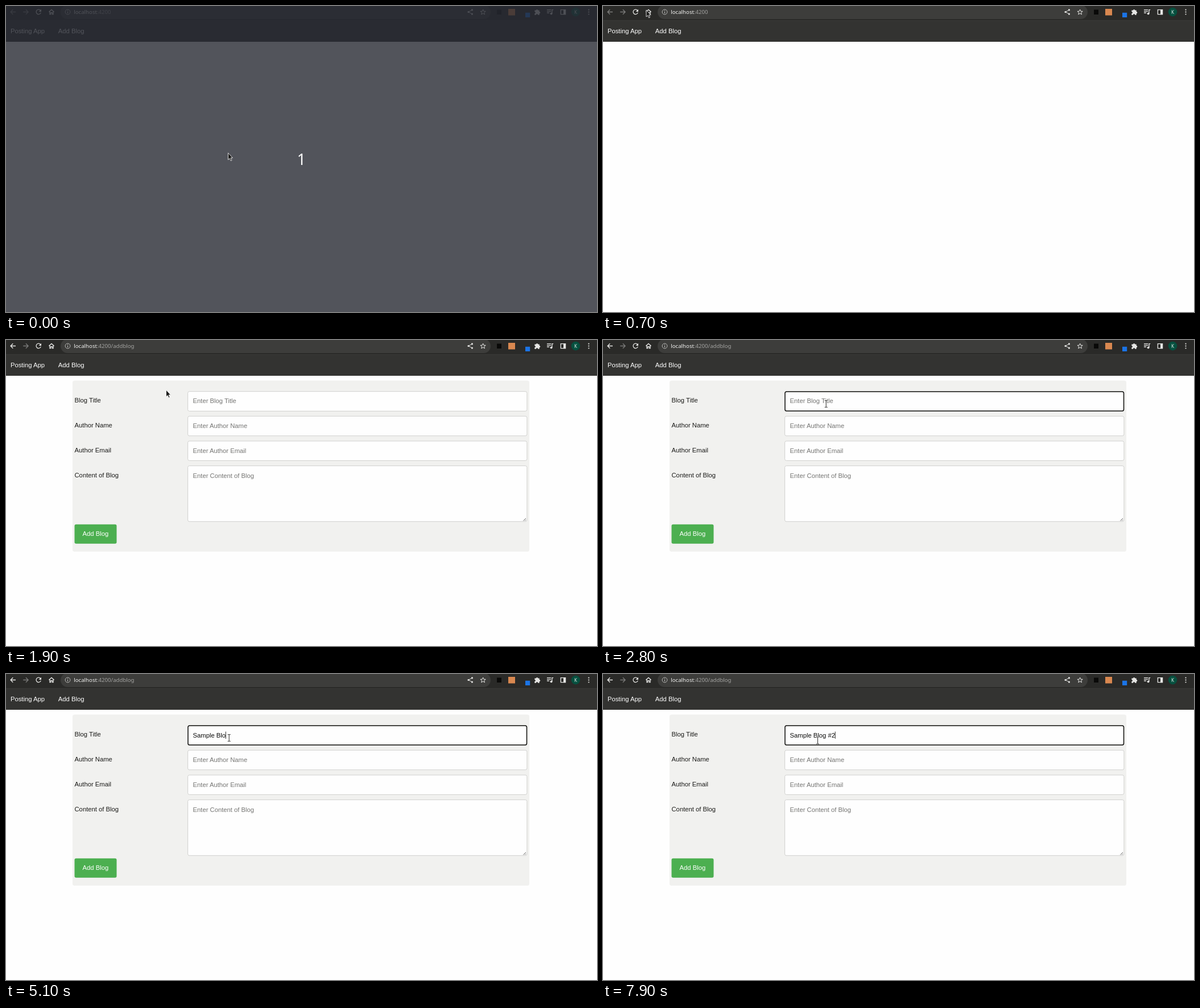
These frames come from a looping animation (1039 px wide and 539 px high, 8000 ms). An HTML page:

```html
<!DOCTYPE html>
<html lang="en">
<head>
<meta charset="utf-8">
<title>Add Blog</title>
<style>
  html, body { margin: 0; width: 100%; height: 100%; overflow: hidden; background: #fefefe; }
  svg { display: block; width: 100%; height: 100%; }
  text { font: 11.25px "Liberation Sans", Arial, sans-serif; white-space: pre; }
  .ui { font-family: "Noto Sans", sans-serif; }
  .url { font-size: 9.65px; }
  .icon { fill: none; stroke: #e6e6e4; stroke-width: 1.3; }
  .solid { fill: #e6e6e4; }
  .field { fill: #fefefe; stroke: #ccccca; stroke-width: .9; }
  .hint { fill: #757573; }
  .cursor { fill: #1c1c1a; stroke: #fff; stroke-width: .8; stroke-linejoin: round; }
</style>
</head>
<body>
<svg viewBox="0 0 1039 539">
  <rect width="1039" height="539" fill="#fefefe"/>

  <g id="toolbar">
    <rect width="1039" height="27" fill="#2a2a28"/>
    <rect y="25.5" width="1039" height="1" fill="#474745"/>
    <rect x="96" y="-1.5" width="756" height="24.5" rx="12.2" fill="#3d3d3b"/>
    <path id="back" class="icon" d="M17 10.5H8.4M12.3 6.3L8.1 10.5L12.3 14.7"/>
    <path class="icon" style="stroke:#7b7b79" d="M30.2 10.5H38.8M34.9 6.3L39.1 10.5L34.9 14.7"/>
    <path class="icon" d="M60.6 7.8A4.2 4.2 0 1 0 61.3 11.6"/>
    <path class="solid" d="M62 5.7V10H57.7Z"/>
    <path class="icon" d="M75.4 10.6L80 6.4L84.6 10.6M76.9 9.8V14.6H78.7V11.6H81.3V14.6H83.1V9.8"/>
    <circle class="icon" cx="108.5" cy="10.5" r="4.4" stroke-width="1" style="stroke-width:1;stroke:#bdbdbb"/>
    <path d="M108.5 9.9V13M108.5 7.8V8.9" stroke="#bdbdbb" stroke-width="1.1"/>
    <text class="ui url" x="119.3" y="14" fill="#f4f4f2">localhost<tspan id="path" fill="#a4a4a2"></tspan></text>

    <path class="icon" style="stroke-width:1" d="M819.4 7L813 10.5L819.4 14"/>
    <g class="solid">
      <circle cx="819.4" cy="6.9" r="1.6"/><circle cx="813" cy="10.5" r="1.6"/><circle cx="819.4" cy="14.1" r="1.6"/>
    </g>
    <path id="star" class="icon" style="stroke-width:1"/>
    <rect x="863" y="6.5" width="8" height="8.5" fill="#090908"/>
    <rect x="883" y="5" width="12" height="11.5" fill="#d98850"/>
    <rect x="913" y="11.8" width="8.2" height="8.2" fill="#1b74e6"/>
    <path class="solid" d="M929.5 7.6H932A1.6 1.6 0 1 1 935.2 7.6H937.7V10A1.6 1.6 0 1 1 937.7 13.2V15.7H935.2A1.6 1.6 0 0 0 932 15.7H929.3V13.2A1.6 1.6 0 0 0 929.3 10Z"/>
    <path class="icon" d="M951 6.6H958.3M951 9.3H958.3M951 12H955.2M960 13.5V6.6H962.3"/>
    <circle class="solid" cx="958.6" cy="13.4" r="1.9"/>
    <path class="icon" d="M975.3 6.6H983.6V14.7H975.3Z"/>
    <rect class="solid" x="980" y="6.2" width="4" height="9"/>
    <circle cx="1001.5" cy="10.6" r="7.8" fill="#06503f"/>
    <text class="ui" x="1001.5" y="13.6" text-anchor="middle" style="font-size:8px" fill="#e8efec">K</text>
    <g class="solid">
      <circle cx="1024.5" cy="6.7" r="1.1"/><circle cx="1024.5" cy="10.6" r="1.1"/><circle cx="1024.5" cy="14.5" r="1.1"/>
    </g>
  </g>

  <g id="nav">
    <rect y="26.5" width="1039" height="36.5" fill="#333331"/>
    <rect id="hover" x="81" y="26.5" width="68" height="36.5" fill="#11110f"/>
    <text x="7.9" y="48.4" fill="#fefefe">Posting App</text>
    <text x="91.8" y="48.4" fill="#fefefe">Add Blog</text>
  </g>

  <g id="form">
    <rect x="117" y="71.5" width="803" height="301.3" rx="3.5" fill="#f1f1ef"/>
    <g id="rows"></g>
    <path d="M909.5 318.5L914 314M912.2 318.5L914 316.7" stroke="#555553" stroke-width=".9"/>
    <rect x="120.5" y="324.8" width="74" height="34" rx="2.8" fill="#4caf50"/>
    <text x="134.5" y="345.4" fill="#fff">Add Blog</text>
    <rect id="focus" x="320" y="91" width="595.5" height="34" rx="2.8" fill="none" stroke="#10100e" stroke-width="1.5"/>
    <text id="typed" x="328.5" y="111.5" fill="#0b0b0a"></text>
    <rect id="caret" y="101.5" width=".9" height="12.5" fill="#10100e"/>
  </g>

  <g id="status">
    <path d="M0 521H146.5Q149.5 521 149.5 524V539H0Z" fill="#a0a09e"/>
    <text class="ui" x=".5" y="535.4" style="font-size:13.05px" fill="#fefefe">localhost:4200/addblog</text>
  </g>

  <g id="count">
    <rect width="1039" height="539" fill="rgb(39,42,50)" fill-opacity=".8"/>
    <text class="ui" x="519.3" y="279.5" text-anchor="middle" style="font-size:26.5px" fill="#fff">1</text>
  </g>

  <path id="arrow" class="cursor" d="M0 0V12L2.7 9.6L4.6 13.8L6.5 13L4.7 8.8H8.1Z"/>
  <path id="hand" class="cursor" d="M-1.2 1.2Q-1.2 0 0 0T1.2 1.2V4.6Q2.4 3.9 3.3 5Q4.5 4.3 5.4 5.5Q7.4 5.2 7.5 7.2V9Q7.5 11 6.4 12.8H-.4Q-2 10.5 -4.2 8.3Q-4.8 6.8 -3.2 6.7L-1.2 8.2Z"/>
  <g id="beam" fill="none">
    <path d="M-2.4 -6H-.7Q0 -6 0 -5Q0 -6 .7 -6H2.4M0 -5V5M-2.4 6H-.7Q0 6 0 5Q0 6 .7 6H2.4" stroke="#fff" stroke-width="2"/>
    <path d="M-2.4 -6H-.7Q0 -6 0 -5Q0 -6 .7 -6H2.4M0 -5V5M-2.4 6H-.7Q0 6 0 5Q0 6 .7 6H2.4" stroke="#2a2a28"/>
  </g>
</svg>
<script>
const LOOP = 8000, STEP = 100;
const $ = id => document.getElementById(id);
const show = (id, on) => $(id).setAttribute('visibility', on ? 'inherit' : 'hidden');

// label, label baseline, field top, field height
const rows = [
  ['Blog Title', 110.4, 90.7, 34.6],
  ['Author Name', 154.3, 134.2, 34.6],
  ['Author Email', 197.9, 178, 34.4],
  ['Content of Blog', 241.8, 221.6, 98.2]
];
$('rows').innerHTML = rows.map(([label, base, top, h], i) =>
  `<text x="120.5" y="${base}" fill="#1a1a18">${label}</text>
   <rect class="field" x="319.6" y="${top}" width="596.3" height="${h}" rx="2.8"/>
   <text class="hint" id="hint${i}" x="328.5" y="${base + 0.9}">Enter ${label}</text>`).join('');

const starPoints = Array.from({ length: 10 }, (_, i) => {
  const a = (i / 5 - 0.5) * Math.PI, r = i % 2 ? 2.1 : 4.9;
  return `${(838.6 + r * Math.cos(a)).toFixed(2)} ${(10.9 + r * Math.sin(a)).toFixed(2)}`;
});
$('star').setAttribute('d', `M${starPoints.join('L')}Z`);

const TITLE = 'Sample Blog #2';
const keyTimes = [3000, 3400, 3700, 4000, 4100, 4200, 4400, 4700, 5000, 5100, 5500, 6200, 7000, 7300];
const caretOff = [[2800, 3000], [6100, 6200], [6800, 7000]];

// time, x, y
const route = [
  [300, 390.5, 258.8], [700, 76, 7], [800, 76, 7], [1300, 111, 50.3],
  [1500, 111, 50.3], [2200, 392.2, 112.5], [7700, 392.2, 112.5], [7900, 377.5, 117]
];

function pointerAt(t) {
  const i = route.findIndex(p => p[0] > t);
  if (i < 0) return route[route.length - 1].slice(1);
  if (i === 0) return route[0].slice(1);
  const [t0, x0, y0] = route[i - 1], [t1, x1, y1] = route[i];
  const u = (t - t0) / (t1 - t0), k = u * u * (3 - 2 * u);
  return [x0 + (x1 - x0) * k, y0 + (y1 - y0) * k];
}

function drawPointer(t) {
  const [x, y] = pointerAt(t);
  const overLink = x >= 81 && x < 149 && y >= 27 && y < 63;
  const overField = t >= 1400 && x > 320 && x < 916 && y > 90 && y < 125;
  const kind = overLink ? 'hand' : overField ? 'beam' : 'arrow';
  for (const id of ['arrow', 'hand', 'beam']) show(id, id === kind);
  $(kind).setAttribute('transform', `translate(${x} ${y})`);
  show('hover', overLink);
  show('status', overLink);
}

function render(ms) {
  const t = Math.floor(ms / STEP) * STEP;
  const open = t >= 1400, focused = t >= 2200;
  show('count', t < 100);
  show('form', open);
  $('path').textContent = open ? ':4200/addblog' : ':4200';
  $('back').style.stroke = open ? '#e6e6e4' : '#7b7b79';

  const typed = TITLE.slice(0, keyTimes.filter(k => k <= t).length);
  $('typed').textContent = typed;
  show('hint0', !typed);
  show('focus', focused);
  show('caret', focused && !caretOff.some(([a, b]) => t >= a && t < b));
  $('caret').setAttribute('x', 328.3 + (typed ? $('typed').getComputedTextLength() : 0));
  drawPointer(t);
}

const start = performance.now();
function tick() {
  render((performance.now() - start) % LOOP);
  requestAnimationFrame(tick);
}
tick();
</script>
</body>
</html>
```
